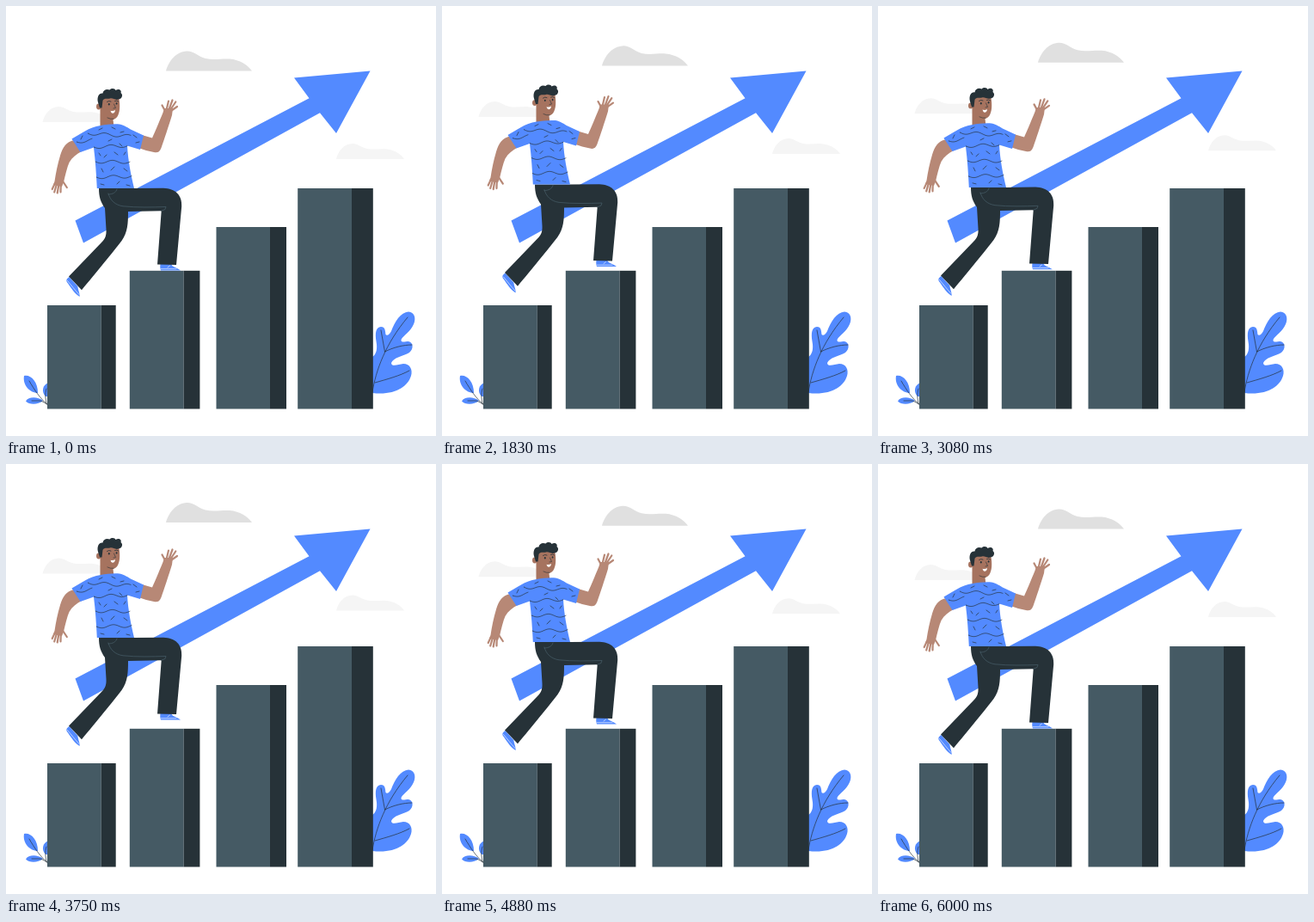
These frames come from a looping animation (500x500 px, 6040 ms). An HTML page with a canvas:

```html
<!DOCTYPE html>
<html lang="en">
<head>
<meta charset="utf-8">
<title>Climbing the chart</title>
<style>
  html, body { margin: 0; width: 100%; height: 100%; overflow: hidden; background: #fff; }
  canvas { display: block; width: 500px; height: 500px; }
</style>
</head>
<body>
<canvas id="stage"></canvas>
<script>
const LOOP = 6040, FPS = 24, LAST = 144, RISE = 10;
const BLUE = '#538aff', DARK = '#263238', SLATE = '#455a64';
const SKIN = '#b78876', FACE = '#a6735f', WHITE = '#fff';

const canvas = document.getElementById('stage');
const dpr = window.devicePixelRatio || 1;
canvas.width = canvas.height = 500 * dpr;
const ctx = canvas.getContext('2d');

function fill(color, d) {
  ctx.fillStyle = color;
  ctx.fill(new Path2D(d));
}

function line(color, width, d) {
  ctx.strokeStyle = color;
  ctx.lineWidth = width;
  ctx.stroke(new Path2D(d));
}

function dot(color, x, y, rx, ry = rx) {
  ctx.fillStyle = color;
  ctx.beginPath();
  ctx.ellipse(x, y, rx, ry, 0, 0, Math.PI * 2);
  ctx.fill();
}

function shifted(x, y, draw) {
  ctx.save();
  ctx.translate(x, y);
  draw();
  ctx.restore();
}

// 0 -> 1 -> 0 over one period
function triangle(t, period) {
  const p = (t % period) / period;
  return 1 - Math.abs(1 - 2 * p);
}

function smallCloud() {
  fill('#f5f5f5', 'M0 0C2 -9 9 -18 19 -18C25 -18 29 -13.5 36 -12C44 -10.5 52 -12.5 59 -11.5C68 -10.5 75 -6 79 0Z');
}

function clouds() {
  fill('#e0e0e0', 'M186 75.5C189 64 198 53 210 52.5C218 52 223 58.5 232 61C241 63.3 250 61 260 61.5C272 62.5 281 68.5 286 75.5Z');
  shifted(384, 178, smallCloud);
  shifted(42.5, 135, smallCloud);
}

function plants() {
  fill(BLUE, 'M426 450V408C431 405 432 398 430.5 390C429 380 430 373.5 436 373C441 373 441 378 441.5 382C443 384 446 382 448 378C452 367 459 356 468 355.5C475 356 477 363 474 370C471 378 462 383 459.5 388C459 392 464 390 468 390C474 391 474 399 469 403C462 407 450 409 448 415C448 420 456 417 462 416C470 416 473 423 471 430C467 443 452 453 426 450Z');
  line(DARK, .7, 'M426 449C430 424 441 393 467 362M440.5 402L436 377M440.5 402C450 397 462 394 472 394M429 438C443 434 458 430 469 424');

  fill(BLUE, 'M21 430C28 428 37 436 37 450C28 450 19 441 21 430Z');
  fill(BLUE, 'M23 459.5C26 454 37 454 43 459C37 464 27 464 23 459.5Z');
  fill(BLUE, 'M50 438C42 440 41 449 46 454L50 454Z');
  line(DARK, .7, 'M27 436C33 446 39 456 49 464M30 459H40C43 460 46 462 49 464M47 445C45 451 46 457 47 462');
}

function bar(x, y, side, right) {
  ctx.fillStyle = SLATE;
  ctx.fillRect(x, y, side - x, 468.5 - y);
  ctx.fillStyle = DARK;
  ctx.fillRect(side, y, right - side, 468.5 - y);
}

function scenery() {
  fill(BLUE, 'M80.5 249.5L352.5 107.3L335 83.5L423.5 75.5L384 148L365 124.3L90 275.5Z');
  plants();
  bar(48, 348, 110.8, 127.7);
  bar(143.8, 307.8, 206.7, 225.4);
  bar(244.5, 257, 307, 326);
  bar(339.2, 212, 402, 426.8);
}

function arms() {
  fill(SKIN, 'M79 156C70 158 66 164 63 174C60 184 58 194 56.5 204L55 208L65 210L67 205C69 196 71 188 73.5 182C77 176 82 172 88 169Z');
  line(SKIN, 2.2, 'M57 206L53.7 213M59 207L56.2 216.5M61.5 207L59.7 217.5M63.8 207L63.5 216.5M65.5 203L70.8 211');

  fill(SKIN, 'M158 150L170 153.5C173 147 178 135 182.5 124L184 119L194 119L193 127C189 140 184 155 180.5 165C178.5 170 176 171 172 170C166 169 160 167 154 165Z');
  line(SKIN, 2.2, 'M185 122L181.5 115.5M187 119L189 110.5M190 119L193.5 109.5M192 119.5L197.3 111.5M192.5 121.5L199 117');
}

function head() {
  dot(FACE, 107.8, 117, 2.8, 3.4);
  fill(FACE, 'M109.5 104L131 105C132.5 113 133 121 130.5 126.5C129 130.5 126.5 131.5 124.5 132L125.5 141H109.5Z');
  fill(DARK, 'M107 112C105.5 106 108 101 112.5 101.5C113 97.5 117 96 120.5 97.5C123 95 127 96 127.5 98C131 95.5 135 98 133.5 101C136.5 103 135 108 131 108.5C127 110 124 106.5 121 107.5C117 108 114 107 112.5 110L111.5 118.5H109Z');
  dot(DARK, 119.8, 114.3, .9, 1.2);
  dot(DARK, 128.6, 113.4, .9, 1.2);
  line(DARK, .8, 'M117.5 111.5Q119.5 109.7 122 111M126.5 110.5Q128.5 109.5 130.5 110.8');
  line(DARK, .6, 'M125.5 114L127.5 118.5L125 119M118 130Q121.5 131.8 125 131.3');
  fill(WHITE, 'M121.5 121.7Q124.5 122.6 127 121Q126.5 125 123.8 124.8Q122 124.2 121.5 121.7Z');
}

function wave(x, y, right, tilt) {
  ctx.beginPath();
  for (let i = x; i <= right; i++) {
    ctx.lineTo(i, y + tilt * (i - x) + 1.8 * Math.sin((i - x) / 4.2));
  }
  ctx.stroke();
}

function shirt() {
  fill(BLUE, 'M110 139C117 138 124 137 132 137.5C138 138.5 142 142 146 144L160 150.5L156 167L141 162.5C142 180 145 195 149 212H105.8C105 196 104 180 102 164.5L86.5 170L76.5 154.5C87 149 96 141 110 139Z');
  ctx.strokeStyle = DARK;
  ctx.lineWidth = .65;
  wave(95, 148, 145, .07);
  wave(82, 158, 100, -.12);
  wave(102, 164, 141, -.04);
  wave(104, 181, 144, .01);
  wave(105, 199, 146, -.02);
  line(DARK, .7, 'M108 144l4 -2M123 141l4 2M133 147l4 -1M89 151l-2 4M148 150l4 3M151 159l4 -1M119 157l4 -2M132 160l3 3M108 171l2 3M126 170l4 3M114 176l3 -3M137 173l2 -3M111 189l2 4M122 191l4 -4M137 189l4 3M110 207l4 1M129 207l3 -3M140 208l4 1');
}

function legs() {
  fill(BLUE, 'M73.5 315C69.5 317.5 69.7 320 72 322.5C76 328.5 80 334.5 85.5 338C86.3 335 84 331 83.3 326Z');
  line(WHITE, .6, 'M71.5 319.5C76 325 80 330 85 335.5');
  fill(BLUE, 'M179.5 300H192C193.5 304 199.5 304.5 203 307.4H180C179 305 179.2 302 179.5 300Z');
  line(WHITE, .6, 'M180 305.7H198M190.5 302L188 304');
  fill(DARK, 'M108 212H149L183 211.7C197 212 205 220 204.2 233L198 301L176 300.5L180.7 238.3L142 239C142 253 141.5 263 134.5 273C125 285.5 104 311 88 330.3L73 314.5L111 275C116 270 116.8 266 116.5 260L115 235C110 228 108 222 108 212Z');
  line(SLATE, .8, 'M119 218C121 226 127 231.5 136 232.8C152 234.5 170 234 186 233.5L185 236.5L180.7 238.3M129 213C128 217 124 219 119 219');
}

function runner() {
  arms();
  head();
  legs();
  shirt();
}

function render(now) {
  // motion advances in 24 steps a second
  const step = Math.min(LAST, Math.floor(((now % LOOP) + 4) * FPS / 1000));
  const t = step / FPS;
  ctx.setTransform(dpr, 0, 0, dpr, 0, 0);
  ctx.lineCap = ctx.lineJoin = 'round';
  ctx.fillStyle = WHITE;
  ctx.fillRect(0, 0, 500, 500);
  shifted(0, -RISE * triangle(t, 6), clouds);
  scenery();
  shifted(0, -RISE * triangle(t, 1.5), runner);
}

const start = performance.now();
function tick() {
  render(performance.now() - start);
  requestAnimationFrame(tick);
}
tick();
</script>
</body>
</html>
```
